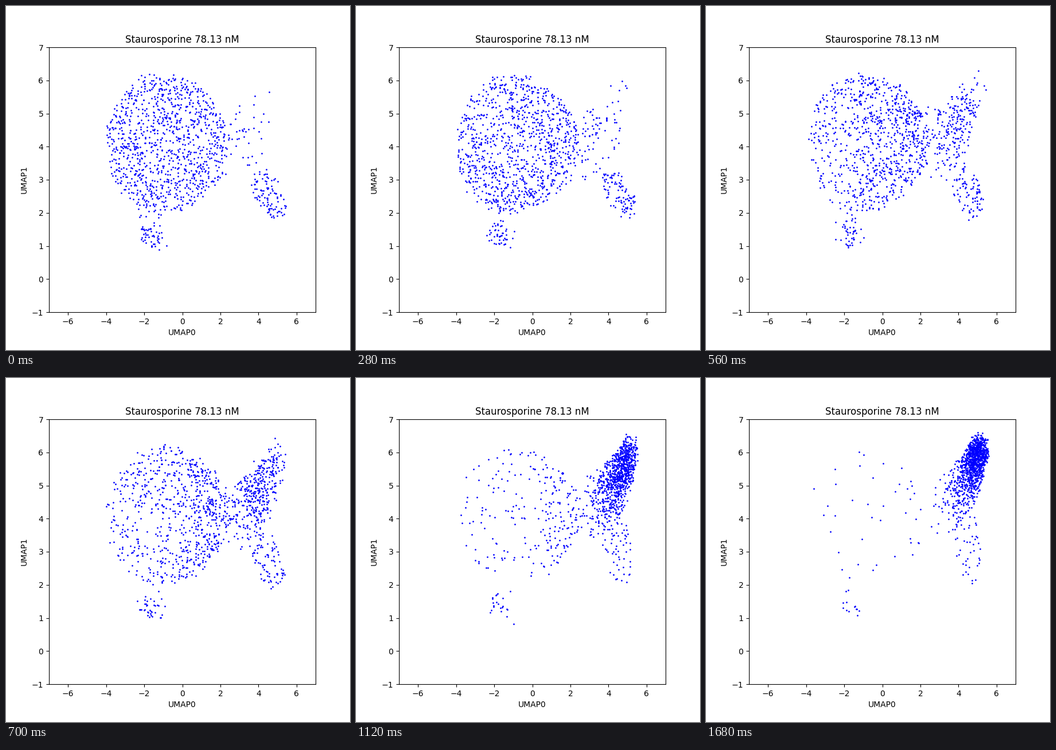
Recreate the animation shown at these times as a matplotlib script. Size 600x600 px, loop 1820 ms.

```python
import numpy as np
import matplotlib.pyplot as plt
from matplotlib.animation import FuncAnimation

FRAMES = 13
STEP_MS = 140
CELLS = 1200
# Bezier path that dying cells follow out of the living cloud
PATH = np.array([(2.8, 4.0), (4.4, 4.8), (5.1, 6.12)])


def disc(rng, n, power=0.5):
    """Points in the unit disc; a lower power favours the rim."""
    angle = rng.uniform(0, 2 * np.pi, n)
    r = rng.random(n) ** power
    return r * np.cos(angle), r * np.sin(angle)


def living(rng, n, pull):
    """Skewed ellipse, thinning out on the lower left as pull grows."""
    u, v = disc(rng, 6000, 0.46)
    dx = 3.2 * u
    x, y = dx - 0.75, 4.1 + (2.07 - 0.07 * dx) * v
    weight = np.exp(pull * (x + 0.6 * y))
    keep = rng.choice(len(x), n, replace=False, p=weight / weight.sum())
    return x[keep], y[keep]


def stalk(rng, n):
    dx = rng.normal(0, 0.33, n)
    return dx - 1.7, 1.0 - 0.25 * dx + 0.5 * abs(rng.normal(size=n))


def tail(rng, n, lift):
    """Lower right cluster that stretches upwards into a column."""
    u, v = disc(rng, n)
    dx = (0.9 - 0.25 * lift) * u
    return 4.5 + dx, 2.55 + 0.6 * lift - 0.4 * dx + (0.6 + 0.6 * lift) * v


def dying(rng, n, mean):
    """Cells spread along the path, packed tighter towards its end."""
    s = rng.beta(3.5 * mean, 3.5 * (1 - mean), n)
    bez = np.array([(1 - s) ** 2, 2 * s * (1 - s), s ** 2])
    x, y = PATH.T @ bez
    u, v = disc(rng, n, 0.6)
    spread = 1.2 - 0.72 * s
    return x + spread * u, y + spread * v


def cells(i):
    rng = np.random.default_rng(100 + i)
    u = i / (FRAMES - 1)
    alive = 1 / (1 + np.exp((i - 6.1) / 1.4))
    counts = [int(1000 * alive + 25), int(14 + 40 * alive), int(45 + 50 * alive)]
    groups = [
        living(rng, counts[0], 0.3 * np.clip((i - 2) / 4, 0, 1)),
        stalk(rng, counts[1]),
        tail(rng, counts[2], 1 - alive),
        dying(rng, CELLS - sum(counts), 0.2 + 0.58 * u * u * (3 - 2 * u)),
    ]
    pts = np.hstack(groups)
    return pts + rng.normal(0, 0.05, pts.shape)


fig, ax = plt.subplots(figsize=(6, 6), dpi=100)
dots, = ax.plot([], [], "b.", markersize=2)
ax.set(xlim=(-7, 7), ylim=(-1, 7), xlabel="UMAP0", ylabel="UMAP1",
       title="Staurosporine 78.13 nM")


def update(i):
    dots.set_data(*cells(i))
    return dots,


anim = FuncAnimation(fig, update, frames=FRAMES, interval=STEP_MS,
                     repeat=True, repeat_delay=0)
plt.show()
```
